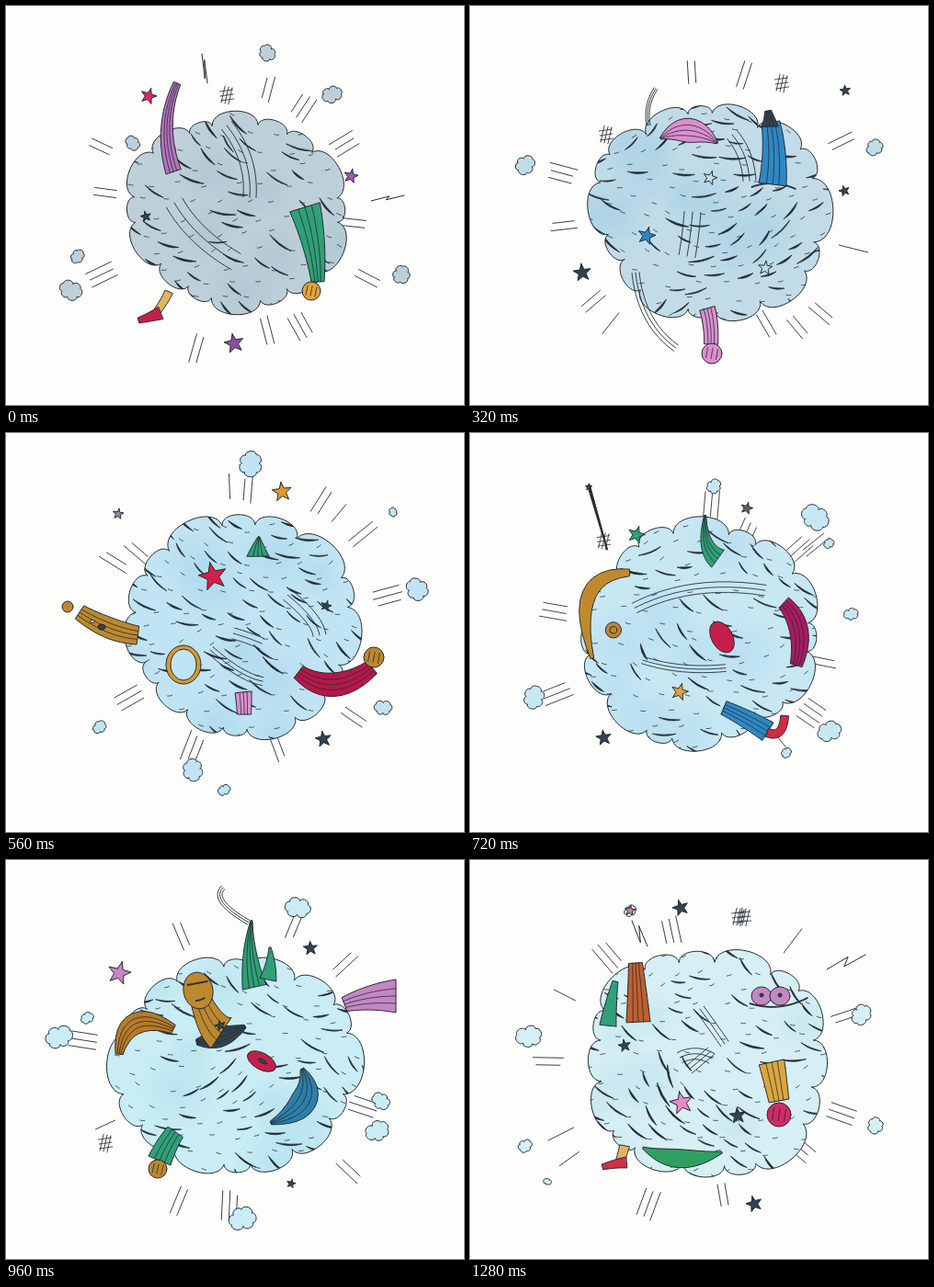
Write an HTML page with a canvas that moves like this. It is 498 by 434 pixels and loops after 1360 ms.

```html
<!DOCTYPE html>
<html lang="en">
<head>
<meta charset="utf-8">
<title>Scuffle cloud</title>
<style>
html, body { margin: 0; width: 100%; height: 100%; overflow: hidden; background: #fdfefc; }
canvas { display: block; }
</style>
</head>
<body>
<canvas id="stage" width="498" height="434"></canvas>
<script>
const ctx = document.getElementById('stage').getContext('2d');
const STEP = 80, STEPS = 17, CX = 250, CY = 222, LOBES = 16, TAU = Math.PI * 2;
const INK = '#252b31', DARK = '#33434e', PAPER = '#fdfefc';
const GREEN = '#2fa077', ORANGE = '#bd882f', RED = '#c41f4c', PURPLE = '#c487c4', PINK = '#dc8fd0', BLUE = '#2f88c4', YELLOW = '#e0b55f';

const mix = (a, b, t) => a + (b - a) * t;

function randomFrom(seed) {
  return () => {
    seed = (seed * 16807 + 11) % 2147483647;
    return seed / 2147483647;
  };
}

function outline(path, width = 1) {
  ctx.lineWidth = width;
  ctx.strokeStyle = INK;
  ctx.stroke(path);
}

function paint(path, color) {
  ctx.fillStyle = color;
  ctx.fill(path);
  outline(path);
}

function polyline(points) {
  const path = new Path2D();
  points.forEach(([x, y]) => path.lineTo(x, y));
  return path;
}

// Point at t on a quadratic curve, moved sideways by side.
function curvePoint([x1, y1, cx, cy, x2, y2], t, side) {
  const x = mix(mix(x1, cx, t), mix(cx, x2, t), t);
  const y = mix(mix(y1, cy, t), mix(cy, y2, t), t);
  const dx = mix(cx - x1, x2 - cx, t), dy = mix(cy - y1, y2 - cy, t);
  const d = Math.hypot(dx, dy) || 1;
  return [x - dy / d * side, y + dx / d * side];
}

const samples = Array.from({ length: 13 }, (_, i) => i / 12);

// A tapered, striped strip along a curve; swell thickens its middle.
function limb(color, curve, startWidth, endWidth, swell = 0) {
  const half = t => (mix(startWidth, endWidth, t) + swell * Math.sin(Math.PI * t)) / 2;
  const edge = k => samples.map(t => curvePoint(curve, t, k * half(t)));
  const path = polyline([...edge(1), ...edge(-1).reverse()]);
  path.closePath();
  paint(path, color);
  if (startWidth + endWidth + swell > 24) [-.45, 0, .45].forEach(k => outline(polyline(edge(k)), .8));
}

function whoosh(curve, width) {
  [-.5, 0, .5].forEach(k => outline(polyline(samples.map(t => curvePoint(curve, t, k * width))), .9));
}

function blob(color, x, y, rx, ry = rx, tilt = 0) {
  const path = new Path2D();
  path.ellipse(x, y, rx, ry, tilt, 0, TAU);
  paint(path, color);
}

function fist(color, x, y, r) {
  blob(color, x, y, r);
  whoosh([x + 1, y - r * .5, x, y, x - 1, y + r * .5], r);
}

function star(x, y, r, color = DARK) {
  const tilt = Math.sin(x + y) * .3 - Math.PI / 2;
  const path = polyline(Array.from({ length: 10 }, (_, i) => {
    const d = i % 2 ? r * .42 : r, a = tilt + i * TAU / 10;
    return [x + d * Math.cos(a), y + d * Math.sin(a)];
  }));
  path.closePath();
  paint(path, color);
}

function hash(x, y) {
  whoosh([x - 7, y + 1, x, y, x + 7, y - 1], 10);
  whoosh([x + 2, y - 9, x, y, x - 2, y + 9], 8);
}

function zigzag(x, y, dx, dy) {
  outline(polyline([[x, y], [x + dx * .55, y + dy * .85], [x + dx * .45, y + dy * .2], [x + dx, y + dy]]));
}

// Joins valley points with lobes that bulge away from the middle.
function lobes(valleys, bulge) {
  const path = new Path2D();
  path.moveTo(...valleys[0]);
  valleys.forEach(([x, y], i) => {
    const [ex, ey] = valleys[(i + 1) % valleys.length];
    const dx = ex - x, dy = ey - y, ox = dy * bulge, oy = -dx * bulge;
    path.bezierCurveTo(x + ox, y + oy, ex + ox, ey + oy, ex, ey);
  });
  path.closePath();
  return path;
}

function puff(x, y, r, color) {
  const valleys = Array.from({ length: 6 }, (_, i) => {
    const a = i * TAU / 6 + x, d = r * (.7 + .14 * Math.sin(i * 2.4 + y));
    return [x + d * Math.cos(a), y + d * .85 * Math.sin(a)];
  });
  paint(lobes(valleys, .5), color);
}

// Parallel speed lines that point away from the middle.
function burst(x, y, n, random) {
  const a = Math.atan2(y - CY, x - CX);
  for (let i = 0; i < n; i++) {
    const side = (i - (n - 1) / 2) * 8, half = 11 + random() * 6;
    const mx = x - Math.sin(a) * side, my = y + Math.cos(a) * side;
    outline(polyline([-half, half].map(d => [mx + Math.cos(a) * d, my + Math.sin(a) * d])), .9);
  }
}

// reach: cloud radius every 30 degrees, clockwise from the right
const poses = [
  {
    at: 0, fill: '#bdd0d9', tint: '#b2c8d3', angle: .55, spread: .5,
    reach: [124, 125, 113, 113, 108, 111, 124, 122, 108, 103, 110, 116],
    bursts: [[285,90,2], [323,110,3], [368,150,3], [378,236,2], [393,296,2], [104,292,3], [207,373,2], [284,353,2], [320,348,3], [108,203,2], [103,153,2]],
    puffs: [[284,51,11], [355,96,12], [138,149,10], [78,272,9], [70,309,14], [430,292,12]],
    parts() {
      hash(240, 97);
      zigzag(213, 52, 6, 32);
      zigzag(397, 212, 36, -6);
      whoosh([240,130, 268,165, 265,208], 14);
      whoosh([183,214, 205,252, 250,278], 20);
      limb('#b673bd', [182,180, 166,130, 186,84], 17, 8);
      limb(GREEN, [325,219, 337,260, 339,300], 34, 14);
      fist('#e2a33b', 332, 310, 10);
      limb(YELLOW, [177,311, 172,322, 163,334], 9, 8);
      limb(RED, [168,334, 158,338, 144,342], 14, 6);
      star(155, 98, 9, '#d8286c');
      star(375, 185, 8, '#a458a8');
      star(248, 367, 11, '#8d4f9f');
      star(152, 229, 6);
    }
  },
  {
    at: 4, fill: '#c1dce8', tint: '#afd4e5', angle: -.05, spread: .9,
    reach: [140, 146, 132, 120, 122, 108, 121, 128, 110, 118, 120, 142],
    bursts: [[241,72,2], [298,75,2], [404,147,2], [100,182,3], [102,239,2], [134,321,2], [153,345,1], [356,349,2], [382,334,2], [322,346,2], [417,264,1]],
    puffs: [[60,173,13], [440,154,11]],
    parts() {
      hash(148, 140);
      hash(339, 84);
      whoosh([242,224, 240,250, 236,272], 18);
      whoosh([285,140, 302,160, 304,190], 14);
      whoosh([180,290, 186,345, 224,372], 8);
      whoosh([194,130, 190,108, 202,90], 4);
      whoosh([306,197, 330,188, 354,199], 1);
      limb(PINK, [207,144, 238,124, 269,149], 2, 2, 24);
      limb(BLUE, [327,127, 333,160, 329,194], 20, 30);
      limb(DARK, [326,131, 326,124, 324,114], 18, 7);
      star(192, 250, 10, BLUE);
      limb(PINK, [258,329, 263,348, 262,368], 17, 15);
      fist(PINK, 263, 378, 11);
      star(261, 187, 8, this.fill);
      star(321, 285, 8, this.fill);
      star(122, 290, 10);
      star(408, 92, 6);
      star(407, 201, 6);
    }
  },
  {
    at: 7, fill: '#c0e4f3', tint: '#b2dbee', angle: .55, spread: .45,
    reach: [133, 125, 120, 111, 105, 108, 120, 130, 132, 137, 140, 146],
    bursts: [[243,58,1], [263,62,2], [343,74,2], [362,87,1], [388,110,2], [143,130,2], [118,140,2], [415,177,3], [134,288,3], [378,309,2], [203,342,3], [295,342,2]],
    puffs: [[266,33,16], [421,86,6], [447,170,15], [410,299,11], [102,320,9], [203,366,14], [237,388,8]],
    parts() {
      whoosh([247,218, 262,222, 278,229], 12);
      whoosh([306,176, 338,202, 341,220], 14);
      whoosh([222,236, 256,266, 279,270], 9);
      limb(ORANGE, [143,220, 112,216, 80,195], 20, 17, 4);
      blob(ORANGE, 67, 189, 6);
      blob(DARK, 104, 211, 4, 3);
      blob(PAPER, 94, 205, 2.5, 1.5);
      blob('#d39b2f', 193, 252, 19, 21);
      blob(this.fill, 193, 252, 14, 17);
      limb('#b5174a', [318,260, 355,290, 398,255], 16, 17, 9);
      fist(ORANGE, 400, 244, 11);
      limb(GREEN, [274,134, 274,123, 275,113], 24, 2);
      limb(PINK, [258,282, 259,295, 259,306], 18, 15);
      star(225, 156, 16, '#d41f4a');
      star(300, 64, 11, '#d99a2f');
      star(122, 88, 6, '#9a86a2');
      star(348, 188, 6);
      star(345, 333, 9);
    }
  },
  {
    at: 10, fill: '#c7e7f3', tint: '#badff0', angle: .5, spread: .7,
    reach: [130, 133, 105, 130, 142, 137, 143, 112, 132, 122, 125, 130],
    bursts: [[263,72,3], [302,105,3], [362,122,3], [381,117,2], [85,193,3], [88,286,3], [388,250,2], [376,308,4], [342,340,1]],
    puffs: [[266,51,10], [380,87,19], [396,116,7], [421,196,9], [62,291,15], [396,329,15], [348,353,7]],
    parts() {
      limb(INK, [124,50, 134,85, 145,123], 3, 1);
      star(124, 52, 4);
      hash(141, 113);
      whoosh([176,189, 240,156, 324,169], 12);
      whoosh([185,248, 228,262, 279,257], 8);
      limb('#c08a2c', [170,149, 100,150, 128,246], 8, 4, 10);
      blob(ORANGE, 152, 214, 9);
      blob(ORANGE, 152, 214, 4);
      limb(GREEN, [270,133, 252,120, 256,84], 24, 2);
      blob(RED, 275, 222, 12, 19, -.5);
      limb('#a81b62', [345,183, 372,210, 359,254], 16, 14, 6);
      limb(BLUE, [277,302, 303,314, 327,329], 16, 24);
      limb('#d02a44', [326,330, 344,338, 346,311], 10, 9);
      star(227, 284, 10, '#e0a03a');
      star(178, 106, 10, GREEN);
      star(141, 336, 9);
      star(303, 76, 7, '#705a5e');
    }
  },
  {
    at: 12, fill: '#c9ecf5', tint: '#bae4f0', angle: .2, spread: .85,
    reach: [140, 130, 123, 122, 122, 135, 146, 126, 122, 118, 122, 138],
    bursts: [[191,82,2], [313,72,2], [368,113,2], [84,196,3], [388,268,3], [188,371,2], [243,376,3], [373,338,2], [108,288,1]],
    puffs: [[318,52,15], [58,193,17], [88,172,8], [408,262,12], [404,295,15], [257,390,17]],
    parts() {
      hash(108, 308);
      whoosh([236,30, 222,44, 264,68], 5);
      limb('#b97a26', [123,211, 130,158, 182,184], 8, 10, 14);
      limb(DARK, [207,198, 232,196, 260,181], 6, 4, 16);
      limb(ORANGE, [211,150, 222,180, 234,188], 22, 40);
      blob(ORANGE, 209, 142, 16, 20, -.2);
      whoosh([197,136, 208,134, 219,132], 1);
      whoosh([206,153, 211,153, 216,150], 1);
      star(233, 180, 6);
      limb(GREEN, [270,138, 262,100, 267,66], 26, 2);
      limb(GREEN, [285,130, 289,112, 287,95], 18, 2);
      limb(PURPLE, [368,157, 395,148, 424,148], 16, 36);
      blob(RED, 278, 219, 17, 9, .5);
      blob(DARK, 279, 219, 5, 2, .5);
      limb('#2d7fa8', [322,227, 342,268, 288,286], 4, 4, 24);
      limb(GREEN, [184,296, 174,310, 167,327], 20, 26);
      fist(ORANGE, 165, 336, 10);
      star(123, 123, 13, PURPLE);
      star(331, 96, 8);
      star(310, 352, 5);
    }
  },
  {
    at: 14, fill: '#d8f4f9', tint: '#cdeef6', angle: .55, spread: .6,
    reach: [143, 148, 133, 127, 122, 133, 143, 136, 120, 130, 138, 153],
    bursts: [[199,80,3], [280,68,4], [405,137,3], [414,157,1], [84,239,2], [94,267,1], [366,340,3], [131,360,2], [329,355,1], [425,238,1]],
    puffs: [[259,42,16], [76,212,12], [396,357,13]],
    parts() {
      zigzag(377, 112, 21, -30);
      zigzag(400, 285, 19, 14);
      zigzag(300, 361, 14, 21);
      whoosh([240,218, 256,212, 264,202], 2);
      whoosh([203,213, 225,235, 250,257], 2);
      limb('#43b384', [175,302, 170,395, 262,364], 28, 18);
      limb(ORANGE, [259,364, 266,350, 266,330], 20, 13);
      limb('#2b6a4c', [117,152, 130,168, 142,183], 18, 16);
      limb(YELLOW, [106,139, 111,145, 116,151], 8, 10);
      limb(DARK, [104,142, 110,132, 108,114], 12, 3);
      for (const x of [319, 341]) {
        blob(PURPLE, x, 140, 11, 18);
        blob(DARK, x - 1, 133, 1);
      }
      blob(ORANGE, 233, 191, 13, 14, -.3);
      whoosh([221,192, 232,184, 246,193], 3);
      limb('#c88a3a', [204,236, 190,247, 170,255], 30, 1);
      star(284, 282, 17, '#cf2150');
      star(215, 74, 6, '#c9345a');
      star(408, 74, 10);
      star(115, 282, 7, '#4b3040');
    }
  },
  {
    at: 16, fill: '#d6eff5', tint: '#c9e8f0', angle: .6, spread: .6,
    reach: [135, 144, 138, 118, 127, 132, 117, 132, 132, 122, 135, 150],
    bursts: [[150,105,3], [219,77,3], [351,88,1], [85,219,2], [404,276,3], [103,147,1], [194,374,3], [275,364,2], [409,169,2], [99,298,1], [108,325,1], [358,313,3]],
    puffs: [[64,192,16], [425,168,14], [441,289,11], [60,311,9], [84,350,5], [174,55,8]],
    parts() {
      hash(292, 62);
      hash(298, 62);
      zigzag(388, 119, 42, -16);
      zigzag(176, 66, 17, 28);
      whoosh([250,162, 264,181, 277,200], 10);
      whoosh([228,215, 246,206, 263,216], 12);
      whoosh([238,228, 250,218, 262,208], 10);
      limb('#c0602f', [183,176, 182,145, 180,112], 26, 15);
      limb(GREEN, [150,180, 153,155, 158,132], 18, 6);
      for (const x of [317, 337]) {
        blob(PURPLE, x, 148, 11, 10);
        blob(DARK, x, 147, 2);
      }
      whoosh([304,156, 336,166, 367,150], 1);
      limb('#dca63c', [328,220, 332,240, 336,262], 28, 22);
      fist('#d02c66', 336, 277, 13);
      limb('#2f9f62', [188,313, 225,334, 274,318], 2, 2, 18);
      limb(YELLOW, [168,311, 166,320, 162,330], 11, 9);
      limb('#d0304a', [170,329, 158,330, 144,334], 12, 6);
      star(230, 264, 13, '#e78ac8');
      star(291, 278, 9);
      star(168, 202, 7);
      star(229, 52, 9);
      star(309, 374, 9);
      star(174, 55, 6, '#e37bb3');
    }
  }
];

function cloudShape(reach) {
  const radius = a => {
    const k = a / TAU * reach.length, i = Math.floor(k);
    const ease = (1 - Math.cos((k - i) * Math.PI)) / 2;
    return mix(reach[i % reach.length], reach[(i + 1) % reach.length], ease);
  };
  const valleys = Array.from({ length: LOBES }, (_, i) => {
    const a = (i + .5 + .2 * Math.sin(i * 2.3 + reach[0])) * TAU / LOBES;
    return [CX + radius(a) * .9 * Math.cos(a), CY + radius(a) * .9 * Math.sin(a)];
  });
  return lobes(valleys, -.42 * Math.sign(-1));
}

function inkStroke(x, y, length, angle, thick) {
  ctx.save();
  ctx.translate(x, y);
  ctx.rotate(angle);
  const path = new Path2D();
  path.moveTo(-length / 2, 0);
  path.quadraticCurveTo(0, length * .12 + thick, length / 2, 0);
  if (thick) {
    path.quadraticCurveTo(0, length * .12 - thick, -length / 2, 0);
    ctx.fillStyle = INK;
    ctx.fill(path);
  }
  outline(path, .7);
  ctx.restore();
}

function hatch(pose, random) {
  for (let row = 0; row < 16; row++) {
    for (let col = 0; col < 11; col++) {
      const x = 100 + col * 29 + row % 2 * 14 + random() * 12;
      const y = 90 + row * 18 + random() * 10;
      const flow = Math.sin(x / 47 + pose.at) * Math.cos(y / 38) + (random() - .5) * .6;
      if (random() < .55) inkStroke(x, y, 15 + random() * 14, pose.angle + pose.spread * flow, 1 + random());
      inkStroke(x + 13, y + 8, 5, flow * .6, 0);
    }
  }
}

function drawCloud(pose, reach, random) {
  const body = cloudShape(reach);
  ctx.fillStyle = pose.fill;
  ctx.fill(body);
  ctx.save();
  ctx.clip(body);
  for (let i = 0; i < 9; i++) {
    const x = 120 + random() * 250, y = 115 + random() * 220, r = 25 + random() * 25;
    const wash = ctx.createRadialGradient(x, y, 0, x, y, r);
    wash.addColorStop(0, pose.tint);
    wash.addColorStop(1, pose.tint + '00');
    ctx.fillStyle = wash;
    ctx.fillRect(x - r, y - r, r * 2, r * 2);
  }
  hatch(pose, random);
  ctx.restore();
  outline(body);
}

// Everything around the cloud flies outwards as its pose ages.
function withDrift(age, draw) {
  const scale = 1 + age * .04;
  ctx.save();
  ctx.translate(CX * (1 - scale), CY * (1 - scale));
  ctx.scale(scale, scale);
  draw();
  ctx.restore();
}

function drawStep(step) {
  const next = poses.find(p => p.at >= step);
  const last = poses.findLast(p => p.at <= step);
  const t = (step - last.at) / (next.at - last.at || 1);
  const pose = t < .5 ? last : next;
  const reach = last.reach.map((r, i) => mix(r, next.reach[i], t));
  const age = step - pose.at;
  const random = randomFrom(1000 + step * 7919);

  ctx.fillStyle = PAPER;
  ctx.fillRect(0, 0, 498, 434);
  ctx.lineCap = ctx.lineJoin = 'round';
  withDrift(age, () => {
    pose.bursts.forEach(([x, y, n]) => burst(x, y, n, random));
    pose.puffs.forEach(([x, y, r]) => puff(x, y, r, pose.fill));
  });
  drawCloud(pose, reach, random);
  withDrift(age, () => pose.parts());
}

let shown = -1;
function tick() {
  const step = Math.floor(performance.now() / STEP) % STEPS;
  if (step !== shown) drawStep(shown = step);
  requestAnimationFrame(tick);
}
tick();
</script>
</body>
</html>
```
